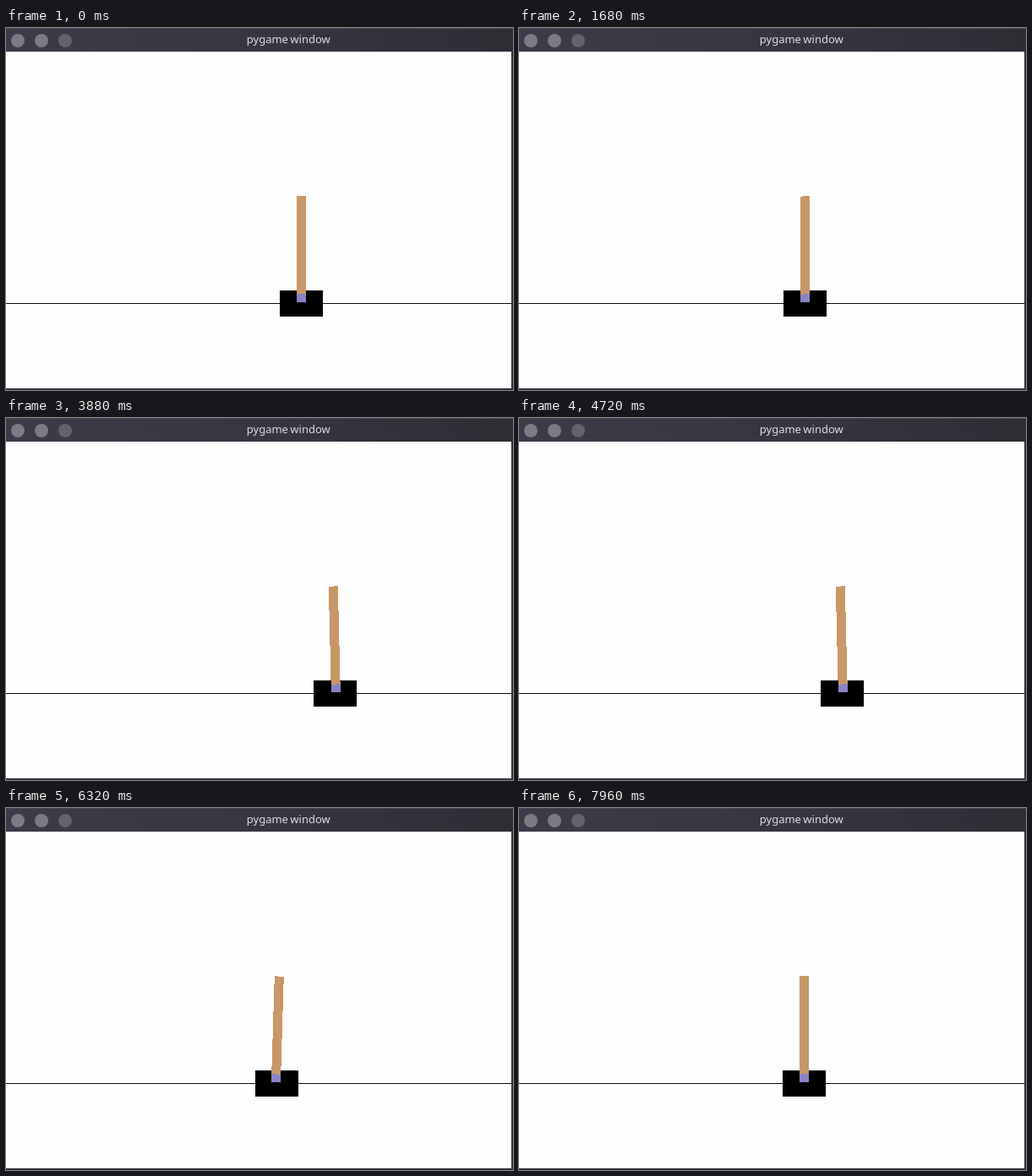
Recreate the animation shown at these times as an HTML page. Size 600x429 px, loop 8000 ms.

```html
<!DOCTYPE html>
<html lang="en">
<head>
<meta charset="utf-8">
<title>Cart and pole</title>
<style>
  html, body { margin: 0; width: 100%; height: 100%; overflow: hidden; background: #fefefe; }
  svg { display: block; width: 100vw; height: 100vh; }
  text { font: 13px "Noto Sans", "Open Sans", sans-serif; word-spacing: -1px; fill: #dedde0; }
</style>
</head>
<body>
<svg viewBox="0 0 600 429">
  <defs>
    <linearGradient id="bar">
      <stop offset="0" stop-color="#3e3a47"/>
      <stop offset=".45" stop-color="#393642"/>
      <stop offset="1" stop-color="#2e2d34"/>
    </linearGradient>
  </defs>
  <rect width="600" height="429" fill="#33323a"/>
  <rect y="28" width="598" height="399" fill="#fefefe"/>
  <rect width="600" height="28" fill="url(#bar)"/>
  <rect width="600" height="1" fill="#4b4854"/>
  <g fill="#7d7a83">
    <circle cx="14" cy="15" r="8"/>
    <circle cx="42" cy="15" r="8"/>
    <circle cx="70" cy="15" r="8" fill="#65626a"/>
  </g>
  <text x="284.8" y="18">pygame window</text>

  <rect y="326" width="598" height="1" fill="#0c0c0c"/>
  <g id="cart">
    <rect y="311" width="51" height="31"/>
    <g id="pole" shape-rendering="crispEdges">
      <rect x="20" y="199.5" width="11" height="125.5" fill="#c99767"/>
      <rect x="20" y="315.5" width="11" height="9.5" fill="#8884c6"/>
    </g>
  </g>
</svg>
<script>
  const LOOP = 8000, STEP = 40;

  // Where the cart turns or changes pace: [seconds, left edge]
  const path = [
    [0, 324], [.16, 326], [1.2, 308.4], [1.68, 313], [2.68, 323], [3.88, 364], [4.3, 369.5],
    [4.72, 357], [5.04, 341.5], [6, 290.2], [6.32, 295], [7.1, 321], [7.76, 309.3], [7.96, 312]
  ];

  const slope = (a, b) => (b[1] - a[1]) / (b[0] - a[0]);

  // Flat at turning points, so the curve never overshoots.
  function tangent(i) {
    if (i === 0 || i === path.length - 1) return 0;
    const before = slope(path[i - 1], path[i]);
    const after = slope(path[i], path[i + 1]);
    return before * after > 0 ? 2 * before * after / (before + after) : 0;
  }

  function cartX(t) {
    if (t <= 0) return path[0][1];
    const next = path.findIndex(p => p[0] > t);
    if (next < 0) return path[path.length - 1][1];
    const i = next - 1, [t0, a] = path[i], [t1, b] = path[next];
    const d = t1 - t0, u = (t - t0) / d, v = 1 - u;
    return v * v * (1 + 2 * u) * a + u * u * (1 + 2 * v) * b
      + d * u * v * (v * tangent(i) - u * tangent(next));
  }

  // A balanced pole leans, in degrees, the way its cart accelerates.
  function lean(t) {
    const push = cartX(t - .4) + cartX(t + .4) - 2 * cartX(t);
    return 2.1 * Math.tanh(.11 * push);
  }

  const cart = document.getElementById("cart");
  const pole = document.getElementById("pole");

  function draw() {
    const t = Math.floor(performance.now() % LOOP / STEP) * STEP / 1000;
    cart.setAttribute("transform", `translate(${Math.round(cartX(t))} 0)`);
    pole.setAttribute("transform", `rotate(${lean(t).toFixed(2)} 25.5 290)`);
    requestAnimationFrame(draw);
  }
  draw();
</script>
</body>
</html>
```
